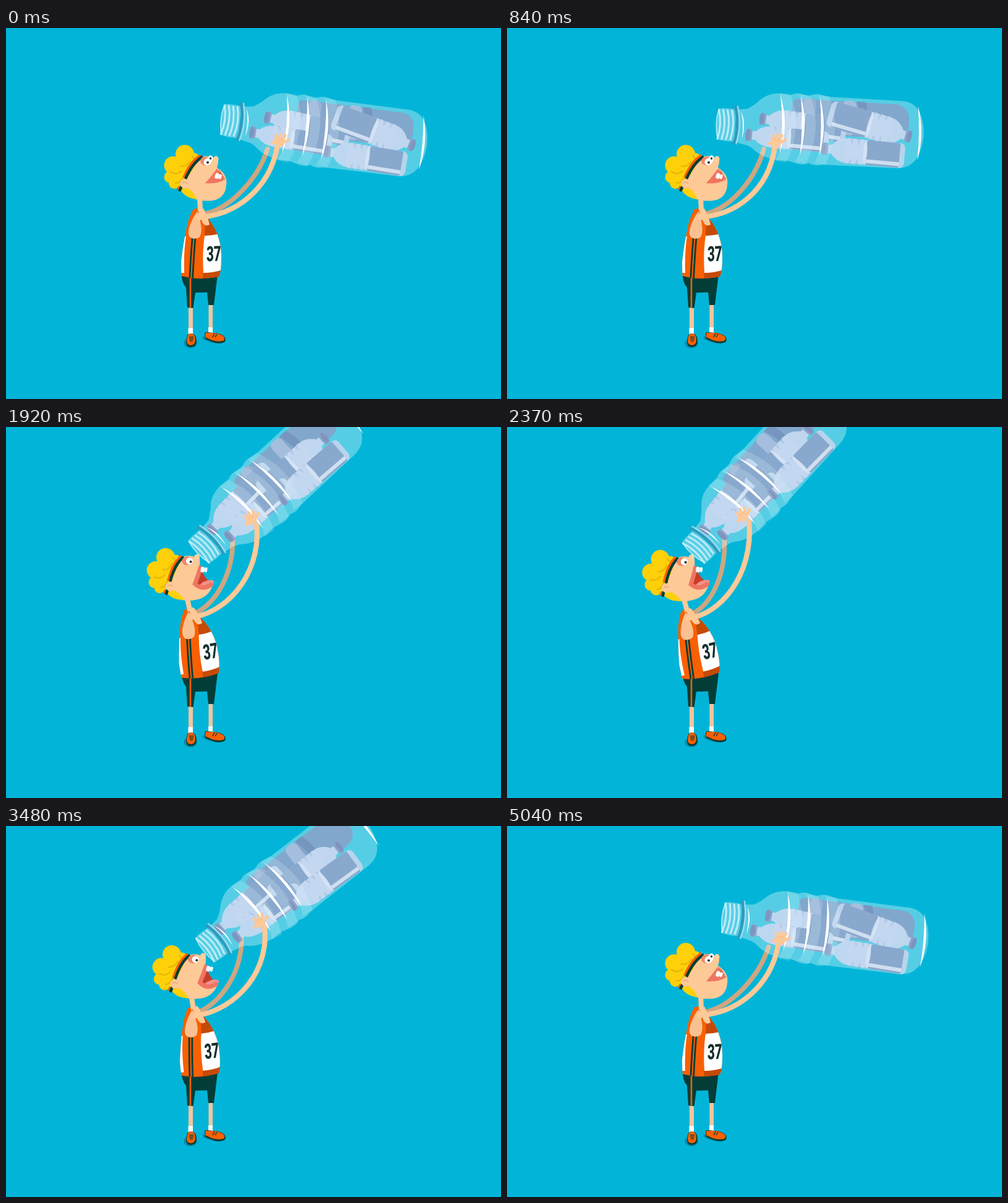
These frames come from a looping animation (800x600 px, 5.07 s). An HTML page with a canvas:

```html
<!DOCTYPE html>
<html lang="en">
<head>
<meta charset="utf-8">
<title>Thirsty runner</title>
<style>
html, body { margin: 0; width: 100%; height: 100%; overflow: hidden; background: #02b5d8; }
canvas { display: block; width: 800px; height: 600px; }
</style>
</head>
<body>
<canvas id="stage" width="800" height="600"></canvas>
<script>
const ctx = document.getElementById('stage').getContext('2d');
const LOOP = 5070;
const SKIN = '#fdc997', SHADE = '#cfa680', DARK = '#033d38', ORANGE = '#f96003';
const YELLOW = '#fdd00a', LIP = '#ef7561', PALE = '#c5d9f2', LABEL = '#86a5cb', CAP = '#8ba1c9';

const mix = (a, b, k) => a + (b - a) * k;
const clamp = v => Math.max(0, Math.min(1, v));
const rad = d => d * Math.PI / 180;

// Smooth curve through [time, value] keys, flat at turning points
function curve(keys, t) {
  const n = keys.length - 1;
  if (t <= keys[0][0]) return keys[0][1];
  if (t >= keys[n][0]) return keys[n][1];
  let i = 0;
  while (t > keys[i + 1][0]) i++;
  const slope = j => j < 0 || j >= n ? 0 : (keys[j + 1][1] - keys[j][1]) / (keys[j + 1][0] - keys[j][0]);
  const tangent = j => {
    const a = slope(j - 1), b = slope(j);
    return a * b <= 0 ? 0 : 2 * a * b / (a + b);
  };
  const d = keys[i + 1][0] - keys[i][0], u = (t - keys[i][0]) / d;
  const v = u * u * (3 - 2 * u);
  return mix(keys[i][1], keys[i + 1][1], v)
    + d * u * (1 - u) * ((1 - u) * (tangent(i) - slope(i)) - u * (tangent(i + 1) - slope(i)))
    + d * u * (1 - u) * (1 - 2 * u) * slope(i);
}

function linear(keys, q) {
  let i = 0;
  while (i < keys.length - 2 && q > keys[i + 1][0]) i++;
  const a = keys[i], b = keys[i + 1], k = clamp((q - a[0]) / (b[0] - a[0]));
  return a.slice(1).map((v, j) => mix(v, b[j + 1], k));
}

const TILT = [[150, 7.3], [420, -7], [700, 7.3], [840, 3.3], [1230, -21], [1500, -34],
  [1770, -40.5], [2370, -47.5], [2700, -50.5], [3060, -49.5], [3200, -50.5], [3390, -45],
  [3580, -27], [3810, -1.4], [3900, 4], [4080, 7.8], [4300, 7.3]];
const SLIDE = [[850, 0], [1500, .85], [2200, 1], [3480, 1], [3810, .55], [4150, .18], [4950, 0]];
const BLINK = [[1390, 0], [1470, 1], [1540, 1], [1640, 0], [4860, 0], [4940, 1], [4975, 1], [5040, 0]];
// upward angle -> bottle x, y
const NECK = [[-7.3, 366, 150], [-3.3, 357, 156], [1.4, 350, 158], [34, 343, 190], [47.5, 312, 192], [50.5, 308, 192]];
// upward angle -> head x, y, head turn, torso turn
const POSE = [[-7.3, 313, 285, 0, 0], [-3.3, 313, 285, 0, 0], [1.4, 310, 285, -.5, -.5],
  [34, 306, 285, -4, -1.8], [47.5, 288, 288, -12, -11], [50.5, 285, 289, -12.6, -11.8]];

function fill(d, color) {
  ctx.fillStyle = color;
  ctx.fill(new Path2D(d));
}
function line(d, color, width) {
  ctx.strokeStyle = color;
  ctx.lineWidth = width;
  ctx.stroke(new Path2D(d));
}
function oval(x, y, rx, ry, color, turn = 0) {
  ctx.fillStyle = color;
  ctx.beginPath();
  ctx.ellipse(x, y, rx, ry, rad(turn), 0, 7);
  ctx.fill();
}
function box(x, y, w, h, r, color) {
  ctx.fillStyle = color;
  ctx.beginPath();
  ctx.roundRect(x, y, w, h, r);
  ctx.fill();
}
function at(x, y, turn, draw) {
  ctx.save();
  ctx.translate(x, y);
  ctx.rotate(rad(turn));
  draw();
  ctx.restore();
}
const about = (x, y, dx, dy, turn, draw) => at(x, y, turn, () => {
  ctx.translate(-dx, -dy);
  draw();
});
function spin(x, y, ox, oy, turn) {
  const c = Math.cos(rad(turn)), s = Math.sin(rad(turn));
  return [ox + x * c - y * s, oy + x * s + y * c];
}

function legs() {
  oval(298, 510, 11, 8, '#078fae');
  oval(334, 504, 17, 5, '#078fae', 12);
  box(295, 448, 7, 40, 0, '#f5c59d');
  box(327.5, 444, 6.5, 42, 0, '#f5c59d');
  box(294.5, 485, 7.5, 12, 1, '#fff');
  box(327, 484, 7, 10, 1, '#fff');
  fill('M292 500Q293 494 299 494Q307 494 308 505Q308 516 299 516Q290 516 291 506Z', DARK);
  fill('M293 499Q295 494 300 494Q306 495 306 506Q305 513 299 513Q292 513 292 506Z', ORANGE);
  line('M296 500H303M296 503H303M297 506H302', DARK, 1.3);
  fill('M321 497Q320 491 326 492L336 493Q345 493 352 498Q357 503 353 508Q345 512 334 508L322 503Z', DARK);
  fill('M322 497Q321 491 327 493L336 493Q346 494 352 499Q355 503 351 506Q342 508 333 505L322 500Z', ORANGE);
  line('M334 500L337 494M338 500L341 495', DARK, 1.4);
  fill('M284 395Q283 411 291 420L293 452L302.5 453L306 428L325 427.5L327 448L336 448L342 398Z', DARK);
  line('M298 402L298 452', ORANGE, 2.6);
}

function torso() {
  const shape = new Path2D('M303 293Q297 303 293 318Q287 345 283 378L283.5 401Q312 409 344 402Q350 386 347 354Q343 332 333 317Q325 307 321 295Q312 290 303 293Z');
  ctx.save();
  ctx.clip(shape);
  fill('M275 285H360V415H275Z', ORANGE);
  fill('M323 285L321 337L318 410H360V285Z', '#c64a05');
  fill('M284 337H291Q287 360 288 396H278Z', '#fff');
  fill('M321 336Q332 336 344 333L356 389Q338 396 319 396Q317 362 321 336Z', '#fff');
  line('M304 335Q301 367 299 410', DARK, 7.5);
  line('M304 335Q301 367 299 410', ORANGE, 2);
  ctx.restore();
  fill('M312 289L319 292Q326 304 329 318Q322 322 318 315Q312 303 310 292Z', SKIN);
  // number wraps round the belly, so it is seen foreshortened
  ctx.save();
  ctx.clip(shape);
  ctx.transform(.6, -.03, 0, 1, 324, 377.5);
  ctx.fillStyle = '#17302f';
  ctx.font = '900 34px Roboto, "Liberation Sans", sans-serif';
  ctx.fillText('37', 0, 0);
  ctx.restore();
}

function shoulder() {
  fill('M309 297Q302 306 297 320Q292 334 298 339Q306 343 313 338Q318 329 314 313Q316 302 309 297Z', '#f9c191');
  line('M310 306L320 306', SKIN, 8);
}

function head(m, blink) {
  const p = (x, y, X, Y) => mix(x, X, m).toFixed(2) + ' ' + mix(y, Y, m).toFixed(2) + ' ';
  line('M313 272L314 296', SKIN, 8);
  for (const [x, y, r] of [[289, 204, 15], [270, 222, 14.5], [303, 213, 11], [265, 241, 9.5], [278, 238, 18], [272, 251, 9], [287, 224, 18]])
    oval(x, y, r, r, YELLOW);
  line('M281 223Q291 226 298 215M300 206Q307 212 303 221M265 232Q275 239 284 231M273 251Q285 250 287 239', '#e7b504', 2.2);
  fill('M315 208Q330 205 337 213L342 227C' + p(354, 233, 336, 238) + p(358, 246, 345, 256) + p(356, 254, 356, 262)
    + 'C' + p(355, 270, 350, 274) + p(345, 280, 338, 280) + '326 279.5C306 280 292 273 283 259Z', SKIN);
  fill('M283 256Q300 257 308 277Q290 275 282 262Z', YELLOW);
  line('M314.5 206Q298 216 287.5 242M281 256L278 262', ORANGE, 4.5);
  line('M318 208Q302 217 290 244M284 256L280 264', DARK, 4.5);
  oval(289, 252, 8, 7.5, SKIN, 40);
  line('M285 251Q289 247 293 252', '#eba878', 1.5);

  oval(322, 215, 8, 7, '#ec8968');
  oval(326, 216, mix(7, 5.5, m), 5.5, '#fff', -30);
  oval(331, 211, 4 * (1 - m), 5 * (1 - m), '#fff', -20);
  oval(mix(326, 328, m), 217.5, 2, 2, '#16302f');
  oval(330.5, 211, 1.8 * (1 - m), 1.8 * (1 - m), '#16302f');
  if (blink > .05) {
    ctx.save();
    ctx.beginPath();
    ctx.rect(312, 205, 24, 21 * blink);
    ctx.clip();
    oval(325, 216, 7.5, 7.5, '#e9785e');
    ctx.restore();
  }
  oval(338, 217, 5, mix(9, 10, m), SKIN, 2);
  oval(339.5, 212, 4, 5, '#fecf9f');

  const jaw = 'M' + p(344, 230, 343, 227) + 'Q' + p(338, 239, 337, 240) + p(331, 247, 329, 254)
    + 'Q' + p(343, 247, 340, 268) + p(352, 241, 357, 258);
  fill(jaw + 'Q' + p(349, 236, 343, 246) + p(344, 230, 343, 227), '#c63e2b');
  if (m > .3) {
    ctx.globalAlpha = clamp((m - .3) * 3);
    oval(348, 257, 12, 5, '#f5918a', -10);
    ctx.globalAlpha = 1;
  }
  line(jaw, LIP, mix(8.5, 7, m));
  at(mix(342, 346, m), mix(239, 233, m), 18, () => {
    box(-4, -4, 6, 9, 2, '#fff');
    box(2, -4, 4.5, 8, 2, '#fff');
  });
}

function arm(sx, sy, c1x, c1y, c2x, c2y, x, y, color, width) {
  ctx.lineCap = 'round';
  line(`M${sx} ${sy}C${c1x} ${c1y} ${c2x} ${c2y} ${x} ${y}`, color, width);
  ctx.lineCap = 'butt';
}

function hand(x, y, turn) {
  at(x, y, turn, () => {
    oval(0, 0, 9, 8, SKIN, 20);
    ctx.lineCap = 'round';
    line('M-5 1L-11 3M-4 -4L-6 -10M1 -6L2 -12M6 -4L9 -11', SKIN, 4.8);
    line('M5 2L15 -4', SKIN, 4.8);
    ctx.lineCap = 'butt';
    line('M-2 -6L-2 -3M4 -6L4 -2', '#eab083', 1);
  });
}

// Small bottle lying along x, cap at its start
function mini(x, y, turn, dir, len, h) {
  const r = h / 2;
  at(x, y, turn, () => {
    ctx.scale(dir, 1);
    box(46, -r, len - 46, h, 8, '#c0d5ee');
    box(66, -r, len - 74, h, 3, LABEL);
    box(66, r - 9, len - 74, 6, 0, '#d4e3f4');
    fill(`M2 -7L9 -7Q20 ${-r} 34 ${-r}H48V${r}H34Q20 ${r} 9 7L2 7Z`, PALE);
    for (let i = 0; i < 3; i++) {
      oval(38 + i * 11, 0, 7.5, r + 1, '#aec6e5');
      oval(36 + i * 11, 0, 6.5, r + .5, PALE);
    }
    oval(64, 0, 3, r, '#d6e5f6');
    box(-6, -10, 10, 20, 4, CAP);
    oval(-3, 0, 4, 9.5, '#7e95bf');
  });
}

const SHELL = 'M18 -25L34 -27Q46 -34 55 -44Q68 -55 86 -55L102 -53Q110 -58 120 -56L132 -53Q140 -58 150 -57L164 -54L285 -54Q319 -52 321 0Q318 54 280 55L160 56Q148 60 138 55Q128 60 116 56L104 53L86 53Q63 50 50 40Q42 32 32 31L18 28Z';

function crescent(x, top, bottom, bulge, width) {
  fill(`M${x} ${top}Q${x + bulge * 2} ${-5} ${x + 4} ${bottom}Q${x + bulge * 2 - width * 2} ${-5} ${x} ${top}Z`, '#fff');
}

function bottle(slide) {
  ctx.translate(-4, 0);
  fill('M-12 -25Q0 -27 16 -25V27Q0 28 -12 25Q-18 0 -12 -25Z', 'rgba(255,255,255,.34)');
  fill(SHELL, 'rgba(255,255,255,.33)');
  ctx.save();
  ctx.clip(new Path2D(SHELL));
  ctx.translate(4, 0);
  ctx.globalAlpha = .93;
  box(102, -48, 190, 56, [8, 22, 22, 8], LABEL);
  box(120, -50, 20, 55, 8, '#9ab4d6');
  box(184, -50, 22, 56, 8, '#a9c0df');
  fill('M206 -49Q216 -22 208 6H222Q230 -22 220 -49Z', '#7795bf');
  mini(57 - 32 * slide, -12, 5 - 9 * slide, 1, 135, 38);
  mini(291 - 36 * slide, 2, 13 * (1 - slide), -1, 132, 43);
  mini(36 + 3 * slide, 15, 2, 1, 128, 34);
  mini(160 - 18 * slide, 30, 2, 1, 128, 40);
  ctx.restore();

  for (const x of [84, 116, 147])
    fill(`M${x} -55L${x + 18} -55Q${x + 42} 0 ${x + 18} 56L${x} 54Q${x + 28} 0 ${x} -55Z`, 'rgba(220,242,255,.2)');
  crescent(86, -52, 42, 9, 4.5);
  crescent(119, -53, 43, 8, 4.5);
  crescent(150, -52, 43, 8, 4.5);
  crescent(309, -48, 40, 7, 4);
  for (const x of [-12, -5, 2, 9])
    line(`M${x} -24Q${x + 7} 0 ${x} 25`, 'rgba(225,246,253,.75)', 3);
  line('M-12 -24Q-18 0 -11 25', 'rgba(220,246,255,.7)', 1.8);
  line('M14 -31Q24 0 15 31', '#3299bd', 4.5);
  line('M18 -31Q27 0 19 31', 'rgba(160,225,240,.85)', 2.5);
  crescent(24, -22, 22, 5, 2);
}

function drops(t, x, y) {
  if (t < 2450 || t > 3400) return;
  for (let i = 0; i < 3; i++) {
    const k = ((t - 2450) / 330 + i / 3) % 1;
    oval(x - 1 + i * 6 + k * 3, y + 28 + k * 30, 1.4, 2.4, '#9fe4f2', i * 30);
  }
}

function draw(t) {
  const tilt = curve(TILT, t), up = -tilt, slide = curve(SLIDE, t);
  const [bx, by] = linear(NECK, up);
  const [hx, hy, turn, lean] = linear(POSE, up);
  const open = clamp((up - 3) / 24);
  const k = clamp((up + 7.3) / 55);
  const onBottle = (x, y) => spin(x, y, bx, by, tilt);
  const onTorso = (x, y) => spin(x - 316, y - 405, 316, 405, lean);

  fill('M0 0H800V600H0Z', '#02b5d8');
  legs();

  let [sx, sy] = onTorso(319, 301);
  let [wx, wy] = onBottle(mix(62, 38, k), mix(38, 18, k));
  arm(sx, sy, sx + mix(42, 33, k), sy - mix(8, 17, k), wx + mix(-16, 4, k), wy + mix(50, 60, k), wx, wy, SHADE, 7.5);

  about(316, 405, 316, 405, lean, torso);
  about(hx, hy, 313, 285, turn, () => head(open, curve(BLINK, t)));
  about(316, 405, 316, 405, lean, shoulder);
  drops(t, bx, by);
  at(bx, by, tilt, () => bottle(slide));

  [sx, sy] = onTorso(311, 306);
  const [px, py] = onBottle(mix(79, 82, k), mix(24, 19, k));
  wx = px + mix(-3, 10, k);
  wy = py + 9;
  arm(sx, sy, sx + mix(60, 50, k), sy - 3, wx - 13 + 20 * Math.min(1, 2 * k), wy + 68 + 20 * k, wx, wy, SKIN, 8.2);
  hand(px, py, 5 - 36 * k);
}

function tick(now) {
  draw(Math.floor(now % LOOP / 30) * 30);
  requestAnimationFrame(tick);
}
requestAnimationFrame(tick);
</script>
</body>
</html>
```
